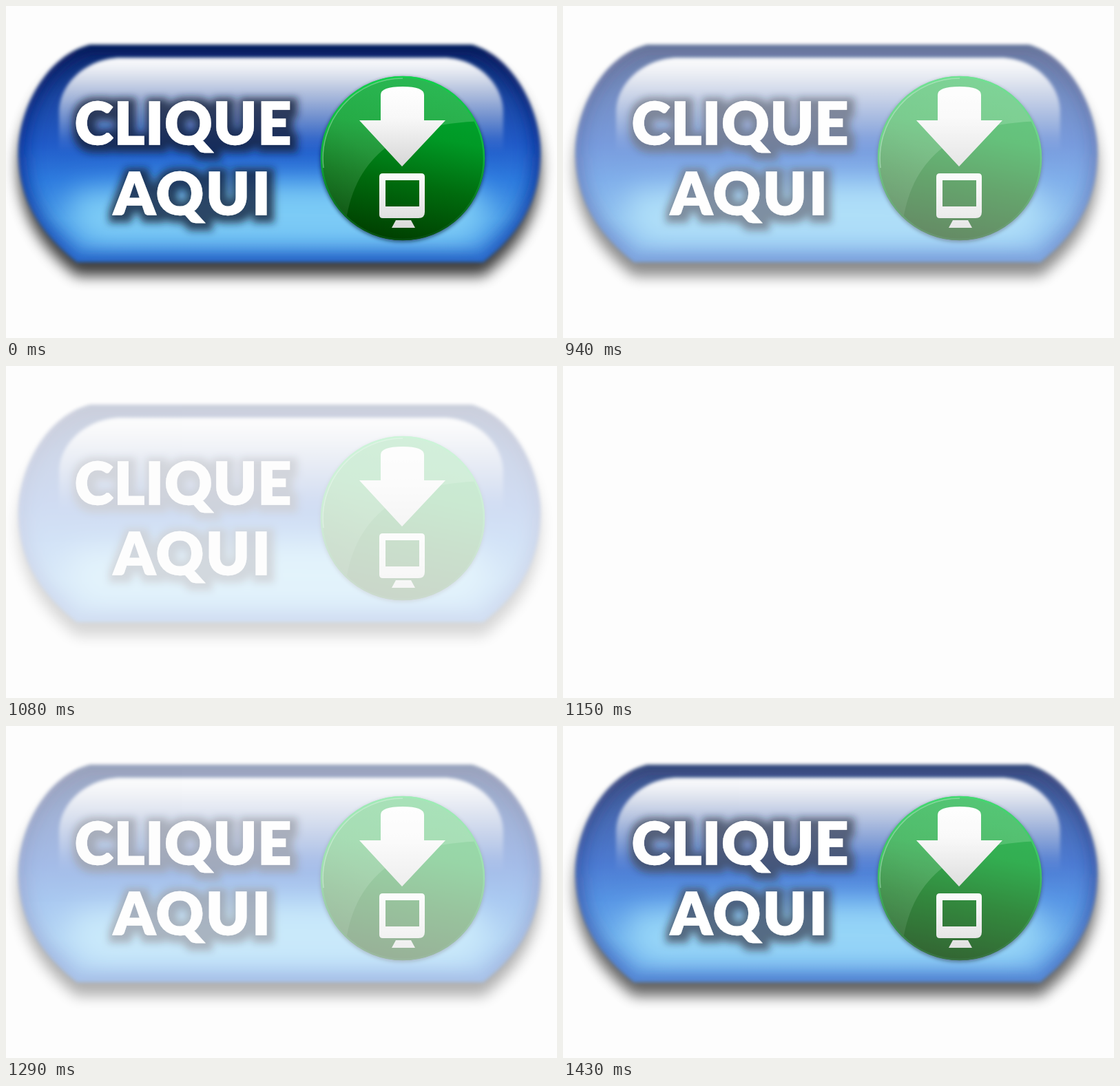
Recreate the animation shown at these times as an HTML page. Size 800x482 px, loop 1.5 s.

```html
<!DOCTYPE html>
<html lang="pt">
<head>
<meta charset="utf-8">
<title>Clique aqui</title>
<style>
  html, body { margin: 0; width: 100%; height: 100%; overflow: hidden; background: #fdfdfd; }
  svg { display: block; width: 100vw; height: 100vh; }
  text { font: 900 85px Lato, "Open Sans", sans-serif; text-anchor: middle; }
</style>
</head>
<body>
<svg viewBox="0 0 800 482">
  <defs>
    <path id="pill" d="M122 56H676C736 72 776 150 776 213C776 280 747 330 693 372H103C49 330 18 280 18 213C18 150 58 72 122 56Z"/>
    <mask id="pillMask" maskUnits="userSpaceOnUse" x="0" y="0" width="800" height="482">
      <use href="#pill" fill="#fff" filter="url(#soft3)"/>
    </mask>
    <clipPath id="discClip"><circle cx="576" cy="221" r="119"/></clipPath>

    <linearGradient id="body" gradientUnits="userSpaceOnUse" x1="0" y1="54" x2="0" y2="372">
      <stop offset="0" stop-color="#061c5c"/>
      <stop offset=".07" stop-color="#0f2f78"/>
      <stop offset=".25" stop-color="#1c48a4"/>
      <stop offset=".46" stop-color="#215bc8"/>
      <stop offset=".62" stop-color="#2d7ade"/>
      <stop offset=".8" stop-color="#4a9ce8"/>
      <stop offset="1" stop-color="#4590e4"/>
    </linearGradient>
    <linearGradient id="gloss" gradientUnits="userSpaceOnUse" x1="0" y1="73" x2="0" y2="212">
      <stop offset="0" stop-color="#fff" stop-opacity=".98"/>
      <stop offset=".1" stop-color="#fff" stop-opacity=".94"/>
      <stop offset=".25" stop-color="#fff" stop-opacity=".8"/>
      <stop offset=".45" stop-color="#fff" stop-opacity=".58"/>
      <stop offset=".66" stop-color="#fff" stop-opacity=".34"/>
      <stop offset=".86" stop-color="#fff" stop-opacity=".1"/>
      <stop offset="1" stop-color="#fff" stop-opacity="0"/>
    </linearGradient>
    <linearGradient id="edge" gradientUnits="userSpaceOnUse" x1="0" y1="54" x2="0" y2="372">
      <stop offset="0" stop-color="#061a5a"/>
      <stop offset=".45" stop-color="#0f389c"/>
      <stop offset="1" stop-color="#2460c4"/>
    </linearGradient>
    <linearGradient id="disc" gradientUnits="userSpaceOnUse" x1="620" y1="102" x2="570" y2="342">
      <stop offset="0" stop-color="#00a832"/>
      <stop offset=".35" stop-color="#009a26"/>
      <stop offset=".65" stop-color="#006c0e"/>
      <stop offset="1" stop-color="#003f00"/>
    </linearGradient>
    <linearGradient id="sheen" gradientUnits="userSpaceOnUse" x1="640" y1="110" x2="490" y2="310">
      <stop offset="0" stop-color="#d8ffe0" stop-opacity=".2"/>
      <stop offset=".6" stop-color="#d8ffe0" stop-opacity=".17"/>
      <stop offset="1" stop-color="#d8ffe0" stop-opacity=".08"/>
    </linearGradient>
    <linearGradient id="rim" x1="0" y1="0" x2="0" y2="1">
      <stop offset="0" stop-color="#12d24c"/>
      <stop offset=".5" stop-color="#0fae3c"/>
      <stop offset="1" stop-color="#064d10"/>
    </linearGradient>
    <linearGradient id="arrow" gradientUnits="userSpaceOnUse" x1="0" y1="115" x2="0" y2="233">
      <stop offset="0" stop-color="#fff"/>
      <stop offset=".4" stop-color="#f8f8f8"/>
      <stop offset="1" stop-color="#d6d6d6"/>
    </linearGradient>
    <linearGradient id="screen" gradientUnits="userSpaceOnUse" x1="0" y1="243" x2="0" y2="322">
      <stop offset="0" stop-color="#fcfcfc"/>
      <stop offset="1" stop-color="#dadada"/>
    </linearGradient>

    <filter id="soft3" x="-10%" y="-20%" width="120%" height="140%"><feGaussianBlur stdDeviation="2.6"/></filter>
    <filter id="soft6" x="-10%" y="-20%" width="120%" height="140%"><feGaussianBlur stdDeviation="6"/></filter>
    <filter id="soft10" x="-10%" y="-20%" width="120%" height="140%"><feGaussianBlur stdDeviation="10"/></filter>
    <filter id="soft20" x="-20%" y="-80%" width="140%" height="260%"><feGaussianBlur stdDeviation="20"/></filter>
    <filter id="halo" filterUnits="userSpaceOnUse" x="50" y="90" width="440" height="270">
      <feMorphology in="SourceAlpha" operator="dilate" radius="8"/>
      <feGaussianBlur stdDeviation="5.5"/>
      <feOffset dx="3" dy="3" result="wide"/>
      <feFlood flood-color="#141e34" flood-opacity=".75"/>
      <feComposite in2="wide" operator="in" result="shade"/>
      <feMerge><feMergeNode in="shade"/><feMergeNode in="SourceGraphic"/></feMerge>
    </filter>
  </defs>

  <g id="button">
    <use href="#pill" y="20" fill="#000" opacity=".76" filter="url(#soft10)"/>

    <g mask="url(#pillMask)">
      <rect y="40" width="800" height="350" fill="url(#body)"/>
      <path d="M100 270Q397 245 694 270Q716 312 668 350H126Q78 312 100 270Z" fill="#7ccbf6" filter="url(#soft20)"/>
      <use href="#pill" fill="none" stroke="url(#edge)" stroke-width="36" opacity=".55" filter="url(#soft10)"/>
      <use href="#pill" fill="none" stroke="url(#edge)" stroke-width="16" opacity=".7" filter="url(#soft6)"/>
      <path d="M162 75H640C690 79 722 117 722 154V212H77V154C77 117 110 79 162 75Z" fill="url(#gloss)" filter="url(#soft3)"/>
    </g>

    <g fill="#fff" stroke="#fff" stroke-width="1.5" filter="url(#halo)">
      <text x="257.6" y="201.3" letter-spacing="1.2">CLIQUE</text>
      <text x="271.5" y="303.3" letter-spacing="3.2">AQUI</text>
    </g>

    <circle cx="576" cy="223" r="120" fill="#08203c" opacity=".6" filter="url(#soft3)"/>
    <circle cx="576" cy="221" r="119" fill="url(#disc)"/>
    <g clip-path="url(#discClip)">
      <path d="M450 95H700V167C625 168 577 184 546 210C514 238 497 275 492 325H450Z" fill="url(#sheen)"/>
    </g>
    <circle cx="576" cy="221" r="118" fill="none" stroke="url(#rim)" stroke-width="2.5"/>
    <path d="M461 235A116 116 0 0 1 576 105" fill="none" stroke="#8fe0a6" stroke-width="1.5" opacity=".6"/>

    <path d="M544 166V129Q544 117 576 117Q607 117 607 129V166H638L575 233L513 166Z" fill="url(#arrow)"/>
    <path d="M547 243H603Q608 243 608 248V299Q608 308 599 308H547Q542 308 542 303V248Q542 243 547 243ZM551 253V291H600V253Z" fill="url(#screen)" fill-rule="evenodd"/>
    <path d="M566 311H588L594 322H560Z" fill="url(#screen)"/>
  </g>
</svg>
<script>
  const LOOP = 1500, HOLD = 870, STEP = 70;
  const fades = [.8, .6, .4, .2, 0, .2, .4, .6, .8];

  const frames = [
    { opacity: 1, offset: 0 },
    ...fades.map((opacity, i) => ({ opacity, offset: (HOLD + i * STEP) / LOOP })),
    { opacity: 1, offset: 1 }
  ].map(frame => ({ ...frame, easing: 'step-end' }));

  document.getElementById('button').animate(frames, { duration: LOOP, iterations: Infinity });
</script>
</body>
</html>
```
